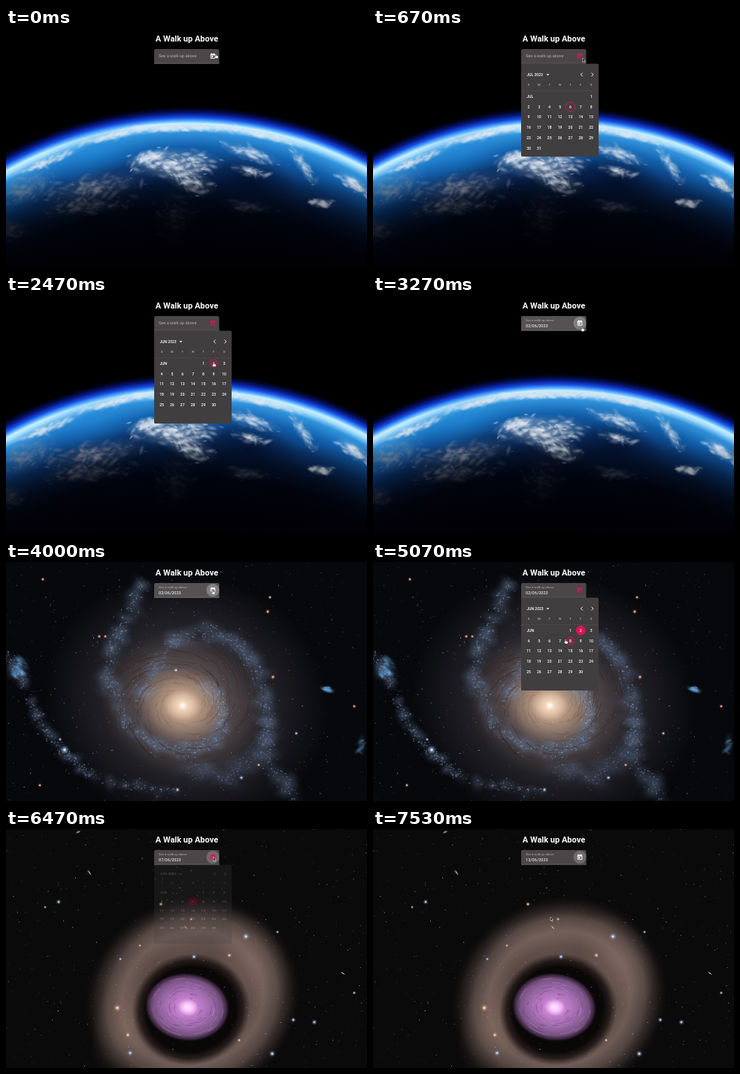
An HTML page with a canvas that plays this animation: 480 px wide and 318 px high, repeating every 7590 ms.

```html
<!DOCTYPE html>
<html lang="en">
<head>
<meta charset="utf-8">
<title>A Walk up Above</title>
<style>
  html, body { margin: 0; width: 100%; height: 100%; overflow: hidden; background: #000; }
  canvas, svg { position: absolute; left: 0; top: 0; width: 480px; height: 318px; }
  text { font-family: Roboto, Arial, sans-serif; fill: #fff; }
  #cal text { font-size: 5px; font-weight: 500; text-anchor: middle; }
  #cal .dim { fill: #aaa6a7; font-size: 4.2px; }
  #cal .left { text-anchor: start; }
</style>
</head>
<body>
<canvas width="480" height="318"></canvas>
<canvas width="480" height="318"></canvas>
<canvas width="480" height="318"></canvas>
<svg viewBox="0 0 480 318">
  <text x="240.5" y="17.6" font-size="11" font-weight="700" text-anchor="middle">A Walk up Above</text>
  <path id="field" d="M197 47.5V30q0-2 2-2H281.500q2 0 2 2V47.500z"/>
  <path d="M197 47.200H283.500" stroke="#8d898a" stroke-width=".5"/>
  <text id="label" font-size="5.6" style="fill:#b3afb0">See a walk up above</text>
  <text id="value" x="203" y="42.600" font-size="5.6"></text>
  <circle id="halo" cx="275" cy="37.300" r="8.600" fill="#fff"/>
  <g id="icon">
    <path d="M272.300 35h5.500v5.400h-5.500z" fill="none" stroke="currentColor" stroke-width=".9"/>
    <path d="M272 34.600h6v2h-6zM272.900 33.600h1v1.200h-1zM276.200 33.600h1v1.200h-1zM273.400 37.300h2v2h-2z" fill="currentColor"/>
  </g>
  <g id="cal">
    <rect x="197" y="47.500" width="103" height="123.500" rx="1.500" fill="#413e3f"/>
    <circle id="prev" cx="277.500" cy="62" r="7" fill="#565253"/>
    <path d="M230.500 61.200h4l-2 2z" fill="#fff"/>
    <path d="M278.700 59.600l-2.400 2.400 2.400 2.400M290.500 59.600l2.400 2.400-2.400 2.400" fill="none" stroke="#fff" stroke-width=".9"/>
    <path d="M197 83.500H300" stroke="#555152" stroke-width=".5"/>
    <circle id="hover" r="6.300" fill="#dc1457" opacity=".35"/>
    <circle id="pick" r="6.400" fill="#dc1457"/>
    <g id="week"></g>
    <g id="jul"></g>
    <g id="jun"></g>
  </g>
  <g id="pointer" stroke-linejoin="round">
    <path id="hand" d="M-.7.6a.7.7 0 0 1 1.400 0V2.500l2 .5q.8.300.600 1.200l-.5 2.300H-.4L-2.200 4q-.2-.8.500-.7l1 .7z" fill="#fff" stroke="#111" stroke-width=".5"/>
    <path id="arrow" d="M0 0V5.200L1.200 4.100l.9 2 .9-.4-.9-2H3.800z" fill="#111" stroke="#fff" stroke-width=".5"/>
  </g>
</svg>
<script>
const LOOP = 7590, PINK = '#dc1457', CELL = 13.85;
const $ = id => document.getElementById(id);
const layers = [...document.querySelectorAll('canvas')];
const [earth, spiral, ring] = layers.map(c => c.getContext('2d'));

let seed = 7;
const rnd = () => (seed = seed * 16807 % 2147483647) / 2147483647;
const bell = () => (rnd() + rnd() + rnd() - 1.5) / 1.1;
const ramp = (t, a, b) => Math.min(1, Math.max(0, (t - a) / (b - a)));

// ---- Backdrops ----
function glow(g, x, y, rx, ry, rot, stops) {
  g.save();
  g.translate(x, y);
  g.rotate(rot);
  g.scale(rx, ry);
  const grad = g.createRadialGradient(0, 0, 0, 0, 0, 1);
  stops.forEach(([at, color]) => grad.addColorStop(at, color));
  g.fillStyle = grad;
  g.fillRect(-1, -1, 2, 2);
  g.restore();
}
const soft = (g, x, y, rx, ry, rot, rgb, a) =>
  glow(g, x, y, rx, ry, rot, [[0, `rgba(${rgb},${a})`], [.5, `rgba(${rgb},${a * .5})`], [1, `rgba(${rgb},0)`]]);

function fill(g, color) {
  g.fillStyle = color;
  g.fillRect(0, 0, 480, 318);
}

function stars(g, n, colors) {
  for (let i = 0; i < n; i++) {
    g.globalAlpha = .15 + .6 * rnd() ** 2;
    g.fillStyle = colors[i % colors.length];
    const s = .5 + rnd() * .7;
    g.fillRect(rnd() * 480, rnd() * 318, s, s);
  }
  g.globalAlpha = 1;
}

function brightStars(g, list, rgb) {
  for (const [x, y, r] of list) {
    soft(g, x, y, r * 2.2, r * 2.2, 0, rgb, .8);
    soft(g, x, y, r, r, 0, '255,255,255', 1);
  }
}

function cloud(g, x, y, rx, ry, rot, a, rgb = '225,232,240') {
  soft(g, x, y, rx * 1.2, ry * 1.3, rot, rgb, a * .5);
  for (let i = 0; i < rx * 2.2; i++) {
    const u = bell() * rx, v = bell() * ry, s = 1 + rnd() * 4;
    soft(g, x + u * Math.cos(rot) - v * Math.sin(rot), y + u * Math.sin(rot) + v * Math.cos(rot),
      s * 2, s * .8, rot + bell(), rgb, a * rnd());
  }
}

function drawEarth(g) {
  fill(g, '#000');
  const shells = [[300, '#000'], [390, '#020818'], [415, '#051633'], [440, '#0a3268'], [465, '#1260ac'],
    [484, '#3193dc'], [492, '#a5defc'], [496, '#c8f0ff'], [500, '#4aa4ff'], [504, '#174ee0'],
    [509, '#081c8c'], [520, 'rgba(0,0,30,0)']];
  glow(g, 243, 623, 520, 520, 0, shells.map(([r, c]) => [r / 520, c]));
  soft(g, 120, 165, 80, 32, -.3, '35,140,220', .6);
  soft(g, 325, 205, 65, 35, .2, '2,10,35', .7);
  [[225, 180, 55, 17, 0, .8], [190, 172, 25, 8, -.3, .7], [240, 200, 38, 14, .4, .5],
   [235, 133, 75, 4, 0, .6], [140, 144, 45, 4, -.22, .5], [340, 143, 60, 4, .22, .5],
   [325, 167, 38, 8, .3, .5], [325, 190, 24, 6, .2, .4], [395, 183, 28, 6, 1, .4],
   [464, 208, 25, 8, .6, .75], [419, 233, 16, 6, .1, .65], [60, 176, 45, 5, -.4, .5]]
    .forEach(c => cloud(g, ...c));
  [[30, 212, 38, 18, -.5, .5, '125,145,165'], [118, 212, 62, 16, -.2, .4, '165,160,165'],
   [105, 238, 55, 10, -.1, .25, '130,128,135'], [225, 250, 25, 35, .2, .16, '110,110,125'],
   [6, 268, 20, 13, 0, .35, '120,115,120'], [320, 238, 35, 8, .1, .18, '110,120,135']]
    .forEach(c => cloud(g, ...c));
  const shade = g.createLinearGradient(0, 200, 0, 318);
  shade.addColorStop(0, 'rgba(0,0,4,0)');
  shade.addColorStop(.5, 'rgba(0,0,4,.5)');
  shade.addColorStop(1, 'rgba(2,0,4,.95)');
  fill(g, shade);
}

// Scatter blue haze and star clusters along a chain of points.
function arm(g, pts, width, a) {
  for (let i = 0; i < pts.length - 1; i++) {
    const [x0, y0] = pts[i], [x1, y1] = pts[i + 1];
    for (let k = 0; k < 75; k++) {
      const u = rnd(), x = x0 + (x1 - x0) * u + bell() * width, y = y0 + (y1 - y0) * u + bell() * width;
      if (k % 4 == 0) soft(g, x, y, width * 1.3, width * .9, bell(), '95,112,140', a * .2);
      soft(g, x, y, .6 + rnd() * 1.5, .6 + rnd() * 1.3, 0, '130,170,225', a * rnd());
    }
  }
}

function drawSpiral(g) {
  fill(g, '#07080c');
  soft(g, 240, 185, 190, 170, .3, '92,88,98', .75);
  soft(g, 235, 190, 110, 95, .3, '160,130,115', .65);
  arm(g, [[185, 25], [160, 75], [138, 115], [138, 165], [160, 215], [205, 250], [255, 250], [290, 225], [288, 190], [265, 165]], 11, .75);
  arm(g, [[175, 185], [195, 145], [225, 105], [275, 90], [315, 115], [340, 155], [346, 210], [350, 260], [380, 310]], 12, .65);
  arm(g, [[0, 120], [22, 155], [45, 215], [80, 255], [120, 290], [225, 308]], 8, .7);
  arm(g, [[235, 270], [290, 285], [330, 265], [350, 225]], 14, .4);
  g.lineWidth = 1.1;
  for (let i = 0; i < 150; i++) {
    const a = rnd() * 6.28, r = 24 + rnd() * 75, twist = -.3 - rnd() * .2;
    g.strokeStyle = `rgba(62,34,25,${.15 + rnd() * .3})`;
    g.beginPath();
    for (let k = 0; k < 5; k++) {
      const q = a + k * twist / 3, s = r * (1 + k * .035) + bell() * 2;
      g.lineTo(235 + s * Math.cos(q), 191 + s * .86 * Math.sin(q));
    }
    g.stroke();
  }
  soft(g, 235, 191, 62, 52, .3, '238,196,160', .85);
  soft(g, 235, 191, 25, 21, 0, '255,232,205', .9);
  soft(g, 235, 191, 6, 6, 0, '255,255,250', 1);
  stars(g, 650, ['#9ab4dc', '#d8dce8', '#c8a890']);
  cloud(g, 15, 142, 12, 15, .8, .7, '110,175,235');
  cloud(g, 428, 169, 6, 4, .4, .7, '110,175,235');
  cloud(g, 473, 242, 5, 12, 0, .5, '110,175,235');
  brightStars(g, [[78, 250, 2.6], [226, 144, 1.5], [386, 228, 1.3], [72, 236, 1.2], [313, 287, 1.5], [228, 303, 1.6]], '150,190,255');
  brightStars(g, [[49, 23, 1.3], [351, 47, 1.3], [348, 66, 1.5], [355, 153, 1.5], [132, 99, 1.2], [45, 297, 1.3], [463, 192, 1.3], [336, 270, 1.2], [124, 99, 1.3]], '255,150,100');
}

function drawRing(g) {
  fill(g, '#0b0a0a');
  glow(g, 248, 226, 148, 136, -.5, [[0, '#50413c'], [.52, '#5c4b46'], [.65, '#6e5c56'], [.78, 'rgba(92,77,72,.85)'],
    [.9, 'rgba(52,43,41,.5)'], [1, 'rgba(11,10,10,0)']]);
  soft(g, 160, 262, 45, 75, .25, '145,118,105', .4);
  soft(g, 325, 175, 45, 70, -.5, '145,120,112', .42);
  soft(g, 235, 143, 80, 32, -.15, '125,105,98', .35);
  glow(g, 246, 240, 79, 74, -.3, [[0, '#080606'], [.76, '#0a0707'], [.88, 'rgba(18,12,12,.75)'], [1, 'rgba(30,22,20,0)']]);
  glow(g, 241, 237, 57, 46, .12, [[0, '#fff'], [.1, '#f0b8f5'], [.25, '#c47fcd'], [.6, '#9867a5'],
    [.82, '#75517f'], [.93, 'rgba(72,48,78,.7)'], [1, 'rgba(20,12,20,0)']]);
  g.lineWidth = .9;
  for (let i = 0; i < 110; i++) {
    const a = rnd() * 6.28, r = 14 + rnd() * 35;
    g.strokeStyle = `rgba(${['90,38,80', '215,150,225', '120,90,165'][i % 3]},.35)`;
    g.beginPath();
    g.ellipse(241, 237, r, r * .78, .12, a, a + .15 + rnd() * .4);
    g.stroke();
  }
  soft(g, 243, 238, 13, 11, 0, '255,215,255', .9);
  stars(g, 650, ['#d8d0cc', '#b8c4d8', '#c89478']);
  brightStars(g, [[319, 143, 2.2], [250, 170, 1.7], [70, 97, 1.6], [410, 257, 1.7], [382, 254, 1.6], [354, 299, 2], [165, 298, 1.8], [463, 218, 1.2], [152, 173, 1.1], [52, 104, 1], [361, 137, 1.1]], '150,195,235');
  brightStars(g, [[148, 238, 2.3], [297, 168, 1.6], [206, 100, 1.5], [162, 274, 1.7], [246, 120, 1.1], [310, 281, 1.2], [178, 155, 1]], '235,175,130');
  soft(g, 111, 58, 5, 1.5, 1, '205,215,235', .9);
  soft(g, 96, 4, 4, 1.7, -.4, '235,205,170', .9);
  soft(g, 448, 192, 4, 1.1, .6, '240,225,205', 1);
  soft(g, 239, 131, 4, 1.3, .9, '235,195,170', .9);
}

drawEarth(earth);
drawSpiral(spiral);
drawRing(ring);

// ---- Calendar ----
const months = { jul: { first: 6, days: 31 }, jun: { first: 4, days: 30 } };
const cell = (day, first) => {
  const i = first + day - 1;
  return [207 + i % 7 * CELL, 91 + Math.floor(i / 7) * CELL];
};
const put = (x, y, s, cls = '') => `<text x="${x}" y="${y + 1.75}" class="${cls}">${s}</text>`;

$('week').innerHTML = [...'SMTWTFS'].map((s, i) => put(207 + i * CELL, 75.7, s, 'dim')).join('');
for (const [id, { first, days }] of Object.entries(months)) {
  const name = id.toUpperCase();
  let out = put(204.5, 62, name + ' 2023', 'left') + put(204.5, 91, name, 'left');
  for (let d = 1; d <= days; d++) out += put(...cell(d, first), d);
  if (id == 'jul') {
    const [x, y] = cell(6, first);
    out += `<circle cx="${x}" cy="${y}" r="6.2" fill="none" stroke="${PINK}" stroke-width=".9"/>`;
  }
  $(id).innerHTML = out;
}

// ---- Timeline ----
const opens = [[200, 2540], [4530, 5330], [6460, 7150]];
const presses = [70, 4400, 6330];
const picks = [[2500, 2], [5290, 7], [7110, 13]];
const path = [[0, 279, 34], [400, 279, 34], [1270, 277.5, 60], [1800, 277.5, 60], [2350, 276, 89],
  [2800, 276, 89], [3200, 278, 42], [3670, 278, 42], [3800, 275, 37], [4650, 275, 37], [5070, 256, 102.500],
  [5200, 249, 103], [5400, 249, 103], [6070, 275.5, 37.500], [6650, 275.5, 37.500], [7050, 236, 117], [LOOP, 236, 117]];

function pointerAt(t) {
  const i = path.findIndex(p => p[0] > t);
  const [t0, x0, y0] = path[i - 1], [t1, x1, y1] = path[i];
  let k = ramp(t, t0, t1);
  k = k * k * (3 - 2 * k);
  return [x0 + (x1 - x0) * k, y0 + (y1 - y0) * k];
}

function place(el, day, first) {
  el.style.display = day ? '' : 'none';
  if (!day) return;
  const [x, y] = cell(day, first);
  el.setAttribute('cx', x);
  el.setAttribute('cy', y);
}

function draw(t) {
  layers[1].style.opacity = ramp(t, 3270, 3530);
  layers[2].style.opacity = ramp(t, 5640, 5930);

  const [x, y] = pointerAt(t);
  const open = opens.some(([a, b]) => t >= a && t < b);
  const june = t >= 1670, { first, days } = june ? months.jun : months.jul;
  const day = picks.reduce((d, [at, n]) => t >= at ? n : d, 0);

  // Input
  const float = ramp(t, 2500, 2650);
  $('label').setAttribute('transform', `translate(203 ${39.3 - 4.7 * float}) scale(${1 - .25 * float})`);
  $('value').textContent = day ? String(day).padStart(2, '0') + '/06/2023' : '';
  $('field').setAttribute('fill', !open && day && t < 7150 ? '#565153' : '#4b4648');
  $('icon').setAttribute('color', open ? PINK : '#fff');
  const ripple = presses.reduce((s, p) => s + ramp(t, p, p + 100) * (1 - ramp(t, p + 180, p + 420)), 0);
  const near = Math.hypot(x - 275, y - 37) < 10;
  $('halo').setAttribute('opacity', (day && !open ? (near ? .26 : .2) : 0) + ripple * .2);

  // Popup
  let show = 0, stretch = 1;
  for (const [a, b] of opens) {
    if (t < a || t > b + 100) continue;
    const grow = 1 - (1 - ramp(t, a, a + 120)) ** 3;
    show = grow * (1 - ramp(t, b, b + 100));
    stretch = .8 + .2 * grow;
  }
  $('cal').setAttribute('opacity', show);
  $('cal').setAttribute('transform', `translate(0 ${47.5 * (1 - stretch)}) scale(1 ${stretch})`);
  $('jul').style.display = june ? 'none' : '';
  $('jun').style.display = june ? '' : 'none';
  $('prev').style.display = Math.hypot(x - 277.5, y - 61) < 7 ? '' : 'none';
  const over = Math.round((y - 90) / CELL) * 7 + Math.round((x - 207) / CELL) - first + 1;
  const hit = open && over >= 1 && over <= days;
  place($('hover'), hit ? over : 0, first);
  place($('pick'), day, first);

  // Pointer
  const hand = open ? y > 54 : near;
  $('pointer').setAttribute('transform', `translate(${x} ${y})`);
  $('hand').style.display = hand ? '' : 'none';
  $('arrow').style.display = hand ? 'none' : '';
}

function tick() {
  draw(performance.now() % LOOP);
  requestAnimationFrame(tick);
}
tick();
</script>
</body>
</html>
```
